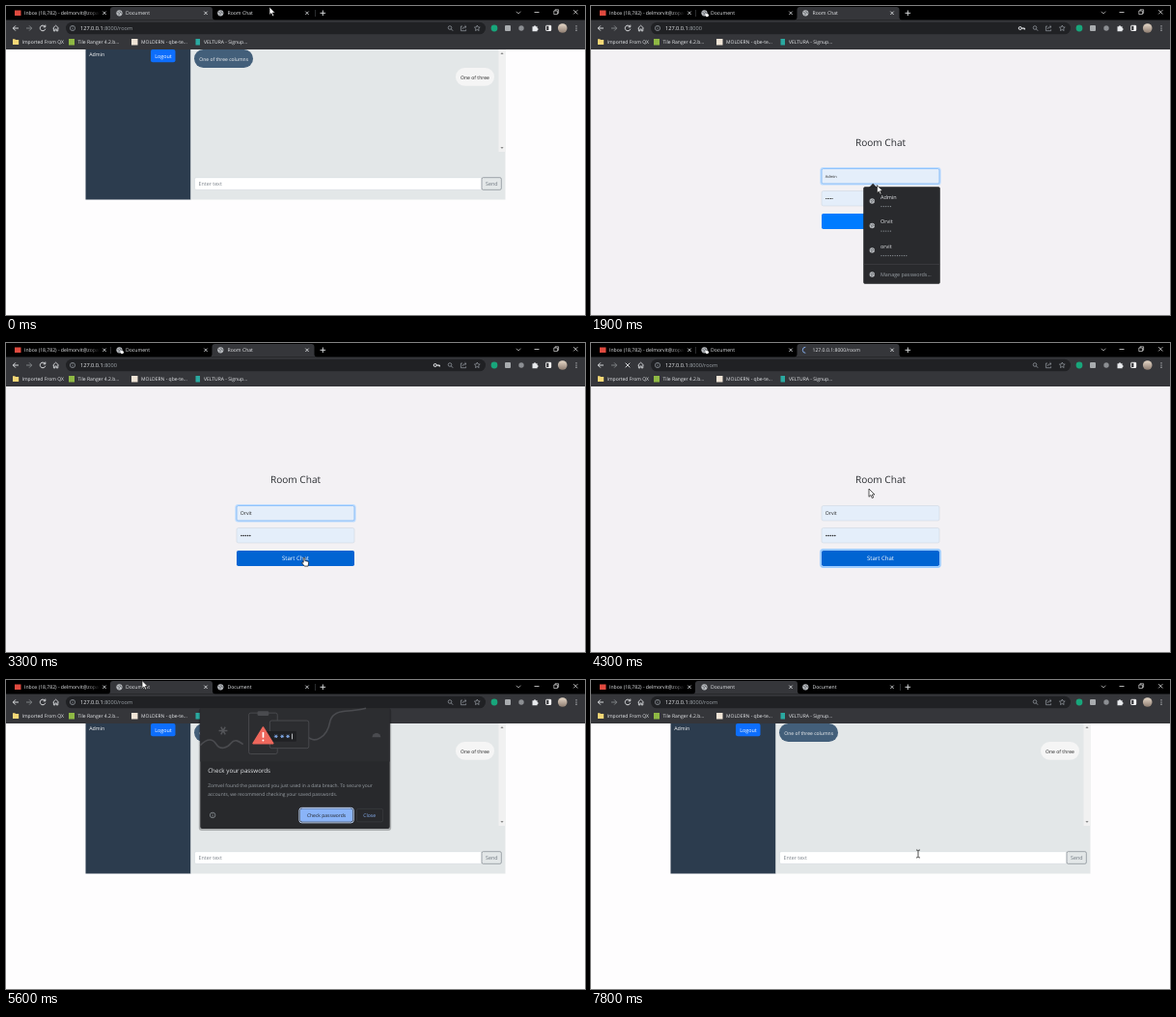
An HTML page that plays this animation: 600 px wide and 320 px high, repeating every 8000 ms.

```html
<!DOCTYPE html>
<html lang="en">
<head>
<meta charset="utf-8">
<title>Room chat demo</title>
<style>
  html, body { margin: 0; width: 100%; height: 100%; overflow: hidden; background: #fefdfe; }
  svg { display: block; width: 600px; height: 320px; }
  text { font-family: "Open Sans", "Noto Sans", sans-serif; text-rendering: geometricPrecision; white-space: pre; }
</style>
</head>
<body>
<svg id="stage" viewBox="0 0 600 320"></svg>
<script>
const LOOP = 8000, STEP = 100;

// Markup helpers
const text = (x, y, s, size, fill, more = '') =>
  `<text x="${x}" y="${y}" font-size="${size}" fill="${fill}" ${more}>${s}</text>`;
const box = (x, y, w, h, fill, r = 0, more = '') =>
  `<rect x="${x}" y="${y}" width="${w}" height="${h}" rx="${r}" fill="${fill}" ${more}/>`;
const dot = (x, y, r, fill, more = '') => `<circle cx="${x}" cy="${y}" r="${r}" fill="${fill}" ${more}/>`;
const line = (d, color, w = .8, more = '') =>
  `<path d="${d}" fill="none" stroke="${color}" stroke-width="${w}" ${more}/>`;
const group = (id, body, more = '') => `<g id="${id}" ${more}>${body}</g>`;
const bullets = (x, y, n, gap, size, color) =>
  line(`M${x} ${y}h${(n - 1) * gap + .01}`, color, size, `stroke-linecap="round" stroke-dasharray="0 ${gap}"`);
const globe = (x, y, r = 3.1) => dot(x, y, r, '#b9bcc0') +
  line(`M${x - r * .7} ${y - r * .4}l${r * .7} ${r * .5}l-${r * .2} ${r * .6}M${x + r * .1} ${y - r * .7}l${r * .3} ${r * .6}l${r * .5} ${r * .1}`, '#55585c', .8);
const cross = (x, y, r, color, w = .8) =>
  line(`M${x - r} ${y - r}l${2 * r} ${2 * r}m0 ${-2 * r}l${-2 * r} ${2 * r}`, color, w);

const BAR = '#35363a', PALE = '#e8eaed', GREY = '#9aa0a6', BLUE = '#8ab4f8';

function tabShape(id, x) {
  return group(id, `<path d="M${x - 3} 14.5q3 0 3-3V4q0-3 3-3h100q3 0 3 3v7.5q0 3 3 3z" fill="${BAR}"/>`);
}

function browser() {
  const close = [102, 207, 312].map(x => cross(x, 7.3, 1.7, PALE)).join('');
  const tabs = box(0, 0, 600, 15, '#000') + tabShape('tab1', 108) + tabShape('tab2', 213.5) +
    box(9, 4.5, 6.5, 5.5, '#e04a3f') +
    text(19, 9.3, 'Inbox (18,782) - delmorvit@zopali', 5.12, PALE) +
    box(84, 2, 13, 11, 'url(#fade)') + box(97, 2, 3, 11, '#000') +
    globe(117.5, 7.3) + group('badge', dot(120.3, 9.6, 1.7, '#fff')) +
    text(124, 9.3, 'Document', 5.12, PALE) +
    group('icon2', globe(222.3, 7.3)) +
    group('spinner', line('M222.3 4.3a3 3 0 0 1 0 6', BLUE, .9)) +
    text(229.5, 9.3, '', 5.12, PALE, 'id="title2"') + close +
    group('split1', box(108, 4, .5, 7, '#55585c')) + group('split2', box(320, 4, .5, 7, '#55585c')) +
    line('M328.3 4.5v5.6m-2.8-2.8h5.6', PALE, .9) +
    line('M528.8 5.8l2.3 2.2 2.3-2.2', '#bbb', .8) + line('M547.5 6.5h5', '#fff', .7) +
    line('M567.8 5h3.6v3.6h-3.6zM569 5V3.8h3.6v3.6h-1.2', '#fff', .6) + cross(590.3, 6.3, 2.1, '#fff', .7);

  const nav = box(0, 14.5, 600, 30.5, BAR) +
    line('M13 23H7.3m2.6-2.6L7.3 23l2.6 2.6', PALE, .9) +
    line('M21 23h5.7m-2.6-2.6l2.6 2.6-2.6 2.6', '#85888c', .9) +
    group('reload', line('M40.3 21.2a2.8 2.8 0 1 0 .5 2.5M40.8 19.6v2.2h-2.2', PALE, .9)) +
    group('stop', cross(38, 23, 2.3, PALE, .9)) +
    line('M48.6 23l3-2.8 3 2.8M49.4 22.6v3.3h1.5v-2h1.4v2h1.5v-3.3', PALE, .8) +
    box(62, 16.7, 435, 12.6, '#202124', 6.3) +
    group('ring', box(62.5, 17.1, 434, 11.8, 'none', 5.9, 'stroke="#6b9be0" stroke-width="1"') +
      box(76.3, 18.5, 39.3, 9, '#6f9ad8')) +
    dot(69, 23, 2.6, 'none', `stroke="${GREY}" stroke-width=".7"`) + line('M69 22.6v1.8m0-3.1v.7', GREY, .7) +
    `<text x="77" y="25" font-size="5.6" fill="${PALE}">127.0.0.1<tspan id="port" fill="${GREY}">:8000</tspan><tspan id="path" fill="${GREY}">/room</tspan></text>` +
    group('key', dot(444.7, 23, 1.5, 'none', `stroke="${PALE}" stroke-width="1"`) + line('M446.2 23h3.2v1.5m-1.3-1.5v1.2', PALE, 1)) +
    dot(460, 22.5, 1.8, 'none', `stroke="${GREY}" stroke-width=".7"`) + line('M461.3 23.8l1.8 1.9', GREY, .8) +
    line('M473 21h-1.6v4.7h5.2v-1.4M473 24q.3-2.5 3.8-2.5m-1.3-1.3l1.5 1.3-1.5 1.4', GREY, .7) +
    line('M488.3 20l.9 1.9 2 .2-1.5 1.4.4 2-1.8-1-1.8 1 .4-2-1.5-1.4 2-.2z', GREY, .7) +
    dot(506, 23, 3.4, '#18a67b') + box(517, 20, 6, 6, '#a9acaf', 1) + dot(534, 23, 2.7, '#8c8f93') +
    `<path d="M545.5 21.3h1.5a1 1 0 0 1 2 0h1.6v1.6a1 1 0 0 1 0 2v1.4h-5.1z" fill="${PALE}"/>` +
    box(559.7, 20.3, 5, 5.2, 'none', .5, 'stroke="#fff" stroke-width=".9"') + box(562.4, 20.3, 2.3, 5.2, '#fff') +
    dot(576.7, 23, 4.8, 'url(#face)') +
    [20.8, 23, 25.2].map(y => dot(591, y, .6, PALE)).join('');

  const marks = `<path d="M7 34.3h2.2l.8.8h3.2v4.8H7z" fill="#f5d776"/>` +
    [[16.5, 'Imported From QX'], [74.5, 'Tile Ranger 4.2.b...'], [140, 'MOLDERN - qbe-te...'], [205, 'VELTURA - Signup...']]
      .map(([x, s]) => text(x, 39.2, s, 5.02, PALE)).join('') +
    box(65, 34, 6, 6.5, '#8fb944') + box(130, 34, 6.5, 6.5, '#f0e4d6') + box(196.5, 34, 4.5, 6.5, '#2aa9a0');
  return tabs + nav + marks;
}

function room() {
  return box(0, 45, 600, 275, '#fefdfe') + box(82.5, 45, 109, 155.5, '#2c3c4e') +
    box(191.5, 45, 326, 155.5, '#e3e7e8') +
    text(86.3, 51.6, 'Admin', 5.26, '#fff', 'id="user"') +
    box(150, 45, 25.5, 13.3, '#0d6efd', 2) + text(154.2, 53.9, 'Logout', 5.4, '#fff') +
    box(195, 45, 61, 19, '#435f7a', 9.5) + text(200.3, 57, 'One of three columns', 5.03, '#f5f5f5') +
    box(466, 64, 40, 18.8, '#f5f5f5', 9.4) + text(471, 75.5, 'One of three', 5.08, '#222') +
    box(510.5, 45, 7, 106, '#f1f1f1') +
    `<path d="M512.4 50l1.6-1.9 1.6 1.9zM512.4 146l1.6 1.9 1.6-1.9z" fill="#8b8b8b"/>` +
    box(195.5, 177.7, 297.5, 12.6, '#fff', 1.5, 'stroke="#ced4da" stroke-width=".5"') +
    text(199.6, 186, 'Enter text', 5.35, '#7b828a') +
    box(493, 177.7, 20.3, 12.6, '#e3e7e8', 1.5, 'stroke="#6c757d" stroke-width=".6"') +
    text(497, 186, 'Send', 5.35, '#6c757d');
}

function login() {
  const field = y => box(239, y, 122, 15.5, '#e4eefa', 1.8, 'stroke="#c9d2dc" stroke-width=".5"');
  return box(0, 45, 600, 275, '#f3f1f4') +
    text(300, 145, 'Room Chat', 10.1, '#2b2e32', 'text-anchor="middle"') +
    group('focus', box(238.2, 167.7, 123.6, 17.1, 'none', 2.4, 'stroke="#bcdcff" stroke-width="1.6"')) +
    field(168.5) + field(191.5) +
    group('focusEdge', box(239, 168.5, 122, 15.5, 'none', 1.8, 'stroke="#80bdff" stroke-width=".8"')) +
    text(242.8, 178.3, 'Admin', 3.95, '#222', 'id="name"') +
    group('passSmall', bullets(243.7, 199.5, 5, 1.6, 1.2, '#222')) +
    group('passBig', bullets(244, 199.5, 5, 2.2, 1.6, '#222')) +
    group('btnRing', box(238, 214, 124, 18, 'none', 2.8, 'stroke="#9cccff" stroke-width="1.8"')) +
    box(239, 215, 122, 16, '#007bff', 1.8, 'id="btn"') +
    text(300, 225.3, 'Start Chat', 6.05, '#fff', 'text-anchor="middle"');
}

function menu() {
  const row = (y, name, n) => globe(291.3, y + 4, 2.7) + text(300, y + 1.7, name, 5.5, PALE) +
    bullets(301, y + 9.6, n, 2.35, 1.2, GREY);
  return `<path d="M288 188l4.2-4.3 4.2 4.3z" fill="#292a2d"/>` +
    box(282.5, 187.5, 79, 100, '#292a2d', 1.5, 'stroke="#1d1e20" stroke-width=".5"') +
    box(282.5, 0, 79, 25.3, '#404145', 0, 'id="hover"') +
    row(198, 'Admin', 5) + row(223.5, 'Orvit', 5) + row(249, 'orvit', 12) +
    box(282.5, 267, 79, .5, '#46474b') + globe(291.3, 278, 2.7) + text(300, 280, 'Manage passwords...', 5.4, GREY);
}

function dialog() {
  const star = (x, y, r, color, w) => line([0, 60, 120].map(a => {
    const c = r * Math.cos(a * Math.PI / 180), s = r * Math.sin(a * Math.PI / 180);
    return `M${x - c} ${y - s}L${x + c} ${y + s}`;
  }).join(''), color, w);
  const shade = '#4a4b4f';
  const art = box(200, 27, 199, 56, '#2c2d30') +
    line('M200 66c8-8 13-7 17-1s11 4 15-1 8-3 13 1M312 56q6 7 14 2t10-16 16-12 22-3', shade, 1.6) +
    star(224, 50.5, 4.5, '#55565a', 1.5) +
    box(251, 32, 30, 43, '#2c2d30', 2, `stroke="${shade}" stroke-width="1"`) + box(260, 30, 12, 5, shade, 1.5) +
    box(273, 40, 41, 29, '#2c2d30', 2, `stroke="${shade}" stroke-width="1"`) +
    box(268, 51, 33, 11, '#202124', 1) +
    [279.5, 286, 292].map(x => star(x, 56.5, 2, BLUE, .8)).join('') + box(296.2, 53.7, .8, 5.8, PALE) +
    `<path d="M266 47l10.5 17h-21z" fill="#ee675c" stroke="#ee675c" stroke-width="1.5" stroke-linejoin="round"/>` +
    box(265.2, 52, 1.7, 6, '#fff', .7) + dot(266, 60.8, 1, '#fff') +
    `<path d="M380.5 57.5a4.5 4.5 0 0 1 9 0z" fill="${shade}"/>`;
  return box(198.5, 27, 202, 128.5, '#000', 3, 'opacity=".25"') + box(200, 27, 199, 126.5, '#28292c', 2) + art +
    text(208, 94.2, 'Check your passwords', 6.3, PALE) +
    text(208, 109.5, 'Zomvel found the password you just used in a data breach. To secure your', 5, GREY) +
    text(208, 118.5, 'accounts, we recommend checking your saved passwords.', 5, GREY) +
    dot(213, 139.2, 2.8, 'none', `stroke="${GREY}" stroke-width=".7"`) + line('M213 138.8v2m0-3.2v.7', GREY, .7) +
    group('okRing', box(304, 131.5, 57, 15.7, 'none', 2.6, 'stroke="#c4d9fb" stroke-width="1"')) +
    box(305, 132.5, 55, 13.7, BLUE, 1.8) + text(332.5, 141.1, 'Check passwords', 5.08, '#202124', 'text-anchor="middle"') +
    box(364.3, 132.5, 27.5, 13.7, 'none', 1.8, 'stroke="#3f4145" stroke-width=".6"') + text(371.3, 141.1, 'Close', 5.1, BLUE);
}

function pointer() {
  const edge = 'fill="#fff" stroke="#111" stroke-width=".7" stroke-linejoin="round"';
  return group('arrow', `<path d="M0 0V8.3l1.9-1.8 1.4 3.1 1.4-.6-1.4-3H5.9z" ${edge}/>`) +
    group('beam', line('M-2-4q1.8 0 2 .8q.2-.8 2-.8M0-3.4v6.8M-2 4q1.8 0 2-.8q.2.8 2 .8', '#222', .8)) +
    group('hand', `<path d="M-.8 5V.6q0-.9.8-.9t.8.9v2.6l3 .7q.9.3.8 1.2l-.5 3.7H.3L-2.5 5.4q.2-1.3 1.7-.4z" ${edge}/>`);
}

const stage = document.getElementById('stage');
stage.innerHTML = `<defs>
  <linearGradient id="fade"><stop stop-color="#000" stop-opacity="0"/><stop offset="1" stop-color="#000"/></linearGradient>
  <linearGradient id="face" x2="0" y2="1"><stop stop-color="#e6d8c8"/><stop offset="1" stop-color="#8d7c70"/></linearGradient>
  </defs>` + group('room', room()) + group('login', login()) + group('menu', menu()) +
  browser() + group('dialog', dialog()) + group('pointer', pointer());

const el = {};
stage.querySelectorAll('[id]').forEach(n => el[n.id] = n);
const show = (id, on) => el[id].style.display = on ? '' : 'none';

// Pointer path: time, x, y
const PATH = [
  [0, 273, 1], [200, 270, 4], [700, 150, 23], [900, 150, 23], [1200, 285.5, 172], [1300, 285.5, 172],
  [1500, 290, 176], [1700, 290, 176], [2200, 306, 200], [2700, 315, 222.5], [3100, 315, 222.5],
  [3600, 300, 222], [4000, 300, 222], [4300, 288, 151], [4400, 288, 151], [4800, 262, 110], [4900, 262, 110],
  [5400, 141, .5], [5600, 141, .5], [5800, 191, 110], [6200, 250, 166], [6700, 372, 137.5],
  [7200, 372, 137.5], [7600, 340.5, 180], [7700, 339.5, 180], [7800, 339, 180], [8000, 339, 180]
];
// Pointer shape from each time on
const SHAPES = [[0, 'arrow'], [600, 'beam'], [1000, 'arrow'], [1200, 'beam'], [1900, 'arrow'],
  [3300, 'hand'], [4100, 'arrow'], [7600, 'beam']];
// Dialog: time, opacity, scale, drop
const POPUP = [[0, 0, 1, 0], [5500, .6, .96, 2], [5600, 1, .987, 1.4], [5700, 1, 1, 0],
  [7200, .5, .98, 0], [7300, 0, 1, 0]];

const latest = (rows, t) => rows.filter(r => r[0] <= t).pop();

function along(t) {
  const i = PATH.findIndex(p => p[0] > t), a = PATH[i - 1], b = PATH[i];
  const k = (t - a[0]) / (b[0] - a[0]);
  return [1, 2].map(n => a[n] + (b[n] - a[n]) * k);
}

function render(t) {
  const within = (a, b) => t >= a && t < b;
  const second = within(200, 5400), onLogin = within(200, 4500), loading = within(4100, 4500);
  const typing = within(700, 1500), picked = t >= 3100;

  show('tab1', !second); show('tab2', second);
  show('split1', second); show('split2', !second);
  show('badge', within(1000, 5400));
  show('icon2', !loading); show('spinner', loading);
  show('stop', loading); show('reload', !loading);
  el.spinner.setAttribute('transform', `rotate(${t * .36 + 72} 222.3 7.3)`);
  el.title2.textContent = t < 4100 ? 'Room Chat' : loading ? '127.0.0.1:8000/room' : 'Document';
  el.path.textContent = within(200, 4100) ? '' : '/room';
  el.port.setAttribute('fill', typing ? PALE : GREY);
  show('ring', typing);
  show('key', within(200, 4100));

  show('room', !onLogin); show('login', onLogin);
  el.user.textContent = second ? 'Orvit' : 'Admin';
  el.name.textContent = t < 2500 ? 'Admin' : 'Orvit';
  el.name.setAttribute('font-size', picked ? 5.2 : 3.95);
  show('passSmall', !picked); show('passBig', picked);
  show('focus', within(1500, 4000)); show('focusEdge', within(1500, 4000));
  show('btnRing', t >= 4000);
  el.btn.setAttribute('fill', t >= 3300 ? '#0064d2' : '#007bff');
  show('menu', within(1600, 3100));
  show('hover', t >= 2000);
  el.hover.setAttribute('y', t < 2500 ? 189.5 : 215);

  const [, alpha, scale, drop] = latest(POPUP, t);
  show('dialog', alpha > 0);
  el.dialog.setAttribute('opacity', alpha);
  el.dialog.setAttribute('transform', `translate(${299.5 * (1 - scale)} ${90 * (1 - scale) + drop}) scale(${scale})`);
  show('okRing', t < 6800);

  const shape = latest(SHAPES, t)[1];
  ['arrow', 'beam', 'hand'].forEach(s => show(s, s === shape));
  el.beam.firstChild.setAttribute('stroke', within(600, 1000) ? '#ddd' : '#222');
  el.pointer.setAttribute('transform', `translate(${along(t).join(' ')})`);
}

const start = performance.now();
function tick() {
  const t = (performance.now() - start) % LOOP;
  render(Math.floor(t / STEP) * STEP);
  requestAnimationFrame(tick);
}
tick();
</script>
</body>
</html>
```
